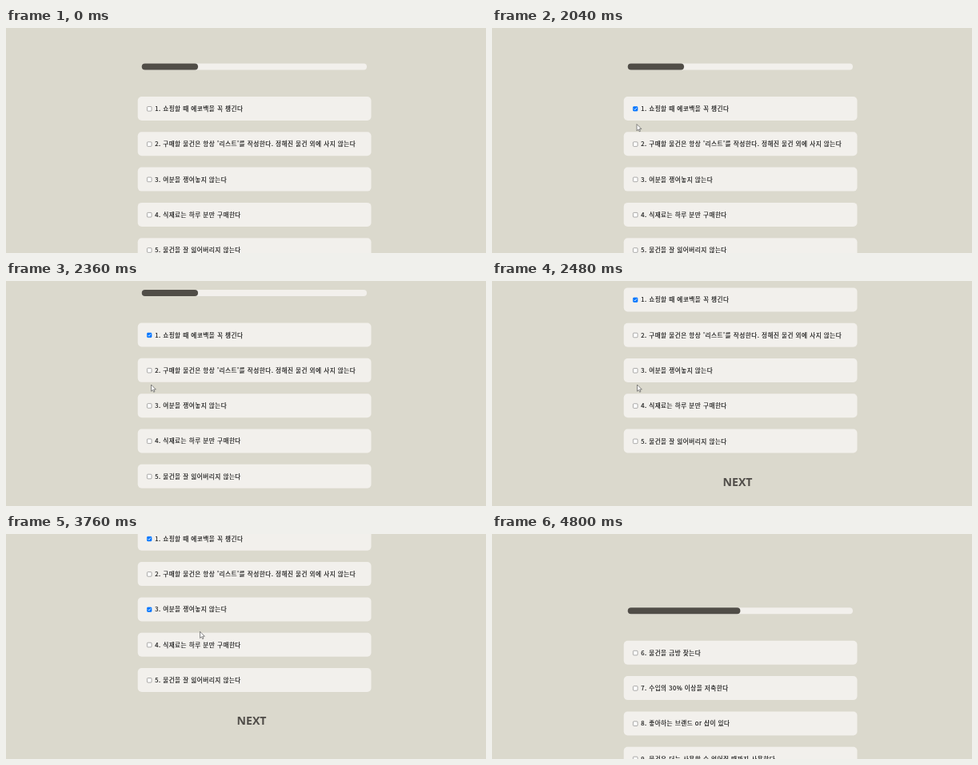
An HTML page for the animation above (5840 ms loop, 600 px wide and 282 px high).

```html
<!DOCTYPE html>
<html lang="ko">
<head>
<meta charset="utf-8">
<style>
html, body { margin: 0; width: 100%; height: 100%; overflow: hidden; background: #dbd9cd; }
svg { display: block; }
.item { font: 7.6px "Noto Sans CJK KR", "Noto Sans CJK", sans-serif; letter-spacing: .5px; fill: #111; stroke: #111; stroke-width: .15; }
.next { font: 700 14.1px "Open Sans", sans-serif; fill: #504d49; text-anchor: middle; }
.url { font: 5.4px "Open Sans", sans-serif; fill: #6a6e74; }
</style>
</head>
<body>
<svg id="stage" width="600" height="282" viewBox="0 0 600 282"></svg>
<script>
const LOOP = 5840, STEP = 44.3, SCROLL = 95.2;
const CHECKED_AT = { 0: 1560, 2: 3080 };
const HOVER = 4120, CLICK = 4480, ENTER = 80, LEAVE = 4780;

const lists = [
  ["1. 쇼핑할 때 에코백을 꼭 챙긴다",
   "2. 구매할 물건은 항상 '리스트'를 작성한다. 정해진 물건 외에 사지 않는다",
   "3. 여분을 쟁여놓지 않는다",
   "4. 식재료는 하루 분만 구매한다",
   "5. 물건을 잘 잃어버리지 않는다"],
  ["6. 물건을 금방 찾는다",
   "7. 수입의 30% 이상을 저축한다",
   "8. 좋아하는 브랜드 or 샵이 있다",
   "9. 물건은 더는 사용할 수 없어질 때까지 사용한다"]
];

// Pointer moves, eased one after another
const moves = [
  { from: 40, to: 160, x: 529.5, y: 84 },
  { from: 320, to: 880, x: 222, y: 110.5 },
  { from: 920, to: 1000, x: 179, y: 108 },
  { from: 1240, to: 1480, x: 180, y: 100 },
  { from: 1640, to: 2280, x: 181.5, y: 130 },
  { from: 2560, to: 2840, x: 178.5, y: 94.5 },
  { from: 3400, to: 3600, x: 200, y: 52 },
  { from: 3600, to: 3960, x: 301, y: 219 },
  { from: 4000, to: 4240, x: 315, y: 233 },
  { from: 4600, to: LEAVE, x: 564, y: 120 }
];

const row = (text, i) => `<g transform="translate(0 ${i * STEP})">
  <rect x="164.7" y="86" width="291.8" height="30" rx="5" fill="#f2f0ec"/>
  <rect class="box" x="176.4" y="98.5" width="5.6" height="5.6" rx="1" stroke-width=".6"/>
  <path class="tick" d="M177.5 101.4l1.2 1.2 2.3-2.7" fill="none" stroke="#fff" stroke-width=".9"/>
  <text class="item" x="186.2" y="104">${text}</text></g>`;

const bar = (width, color) =>
  `<rect x="169.7" y="44.5" width="${width}" height="8" rx="4" fill="${color}"/>`;

const page = (list, n) => `<g id="page${n}">
  ${bar(281.3, "#f2f0ec")}${bar(281.3 * (n + 1) / 4, "#504d47")}
  ${list.map(row).join("")}</g>`;

const $ = id => document.getElementById(id);
$("stage").innerHTML = lists.map(page).join("") + `
  <g id="next"><text class="next" x="307" y="334.7">NEXT</text>
    <path id="line" d="M288.7 339.4h36.6" stroke="#504d49" stroke-width="1.2"/></g>
  <g id="status"><path d="M0 277.8h114q1 0 1 1V282H0z" fill="#dfe1e5"/>
    <text class="url" x="1.5" y="284">127.0.0.1:8000/diagnosis-test/test_page/#</text></g>
  <g id="pointer" fill="#fff" stroke="#3c3c3c" stroke-width=".6">
    <path id="arrow" d="M0 0V8.2L1.9 6.4 3.1 9.2 4.4 8.7 3.2 5.9H5.8Z"/>
    <path id="hand" d="M-.7 .6Q0-.5 .7 .6V3L3.6 3.8Q4.2 4 4.1 5L3.6 8H.1L-2 5.2Q-1.7 4.3-.7 5Z"/>
  </g>`;
$("page0").append($("next"));

const show = (el, on) => el.style.display = on ? "" : "none";
const place = (el, x, y) => el.setAttribute("transform", `translate(${x} ${y})`);
const boxes = [...document.querySelectorAll(".box")];
const ticks = [...document.querySelectorAll(".tick")];

function ease(t, from, to) {
  const p = Math.min(1, Math.max(0, (t - from) / (to - from)));
  return p * p * (3 - 2 * p);
}

function pointerAt(t) {
  let x = 600, y = 92;
  for (const m of moves) {
    const p = ease(t, m.from, m.to);
    x += (m.x - x) * p;
    y += (m.y - y) * p;
  }
  return [x, y];
}

function draw(t) {
  const second = t >= CLICK;
  const overNext = t >= HOVER && !second;
  const scroll = SCROLL * ease(t, 2214, 2582);
  const [x, y] = pointerAt(t);

  show($("page0"), !second);
  show($("page1"), second);
  place($("page0"), 0, -scroll);
  place($("page1"), 0, 47.8);
  show($("line"), overNext);
  show($("status"), overNext);

  boxes.forEach((box, i) => {
    const on = t >= CHECKED_AT[i];
    const middle = 101.3 + i * STEP - scroll;
    const hover = Math.hypot(x - 179.2, y - middle) < 4;
    const blue = hover ? "#005cc8" : "#0075ff";
    box.setAttribute("fill", on ? blue : "#fff");
    box.setAttribute("stroke", on ? blue : "#767676");
    show(ticks[i], on);
  });

  show($("pointer"), t >= ENTER && t < LEAVE);
  place($("pointer"), x, y);
  show($("arrow"), !overNext);
  show($("hand"), overNext);
}

const start = performance.now();
function tick() {
  draw((performance.now() - start) % LOOP);
  requestAnimationFrame(tick);
}
tick();
</script>
</body>
</html>
```
